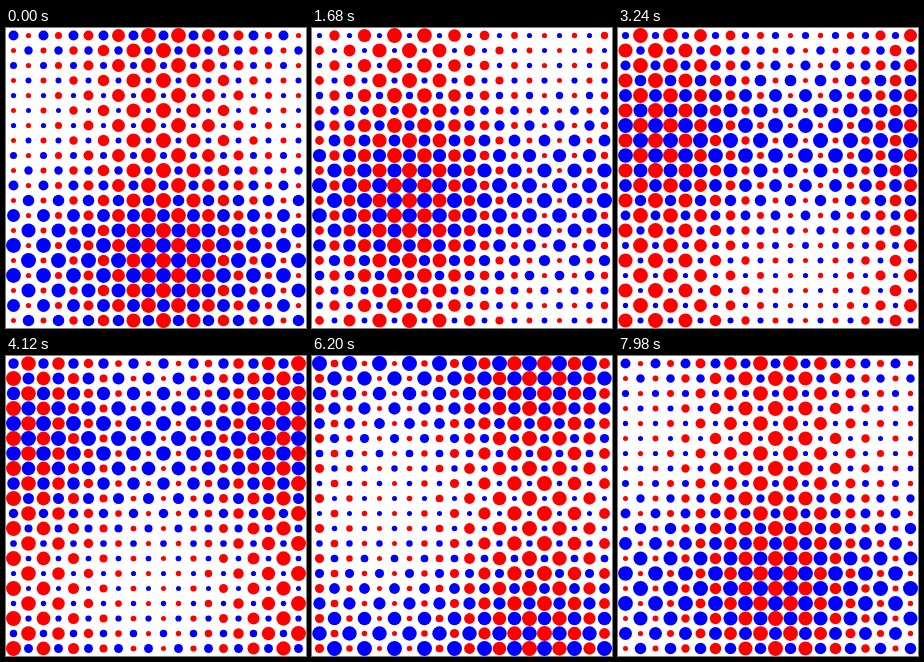
These frames come from a looping animation (300 by 300 pixels, 8 s). An HTML page with a canvas:

```html
<!DOCTYPE html>
<html lang="en">
<head>
<meta charset="utf-8">
<title>Dot waves</title>
<style>
  html, body { margin: 0; width: 100%; height: 100%; overflow: hidden; background: #fff; }
  canvas { display: block; }
</style>
</head>
<body>
<canvas id="stage" width="300" height="300"></canvas>
<script>
const ctx = document.getElementById('stage').getContext('2d');
const COUNT = 20, CELL = 15, LOOP = 8000, STEP = 20;
const TAU = 2 * Math.PI;

function draw(ms) {
  const phase = Math.floor((ms % LOOP) / STEP) * STEP / LOOP;
  ctx.fillStyle = '#fff';
  ctx.fillRect(0, 0, 300, 300);
  for (let row = 0; row < COUNT; row++) {
    for (let col = 0; col < COUNT; col++) {
      // Red dots swell in a wave moving left, blue dots in a wave moving up.
      const red = (row + col) % 2 === 1;
      const wave = red
        ? -Math.cos(TAU * (col / COUNT + phase))
        : -Math.sin(TAU * (row / COUNT + phase));
      ctx.fillStyle = red ? '#f00' : '#00f';
      ctx.beginPath();
      ctx.arc((col + 0.5) * CELL, (row + 0.5) * CELL, 5 + 2.5 * wave, 0, TAU);
      ctx.fill();
    }
  }
}

function tick() {
  draw(performance.now());
  requestAnimationFrame(tick);
}
tick();
</script>
</body>
</html>
```
